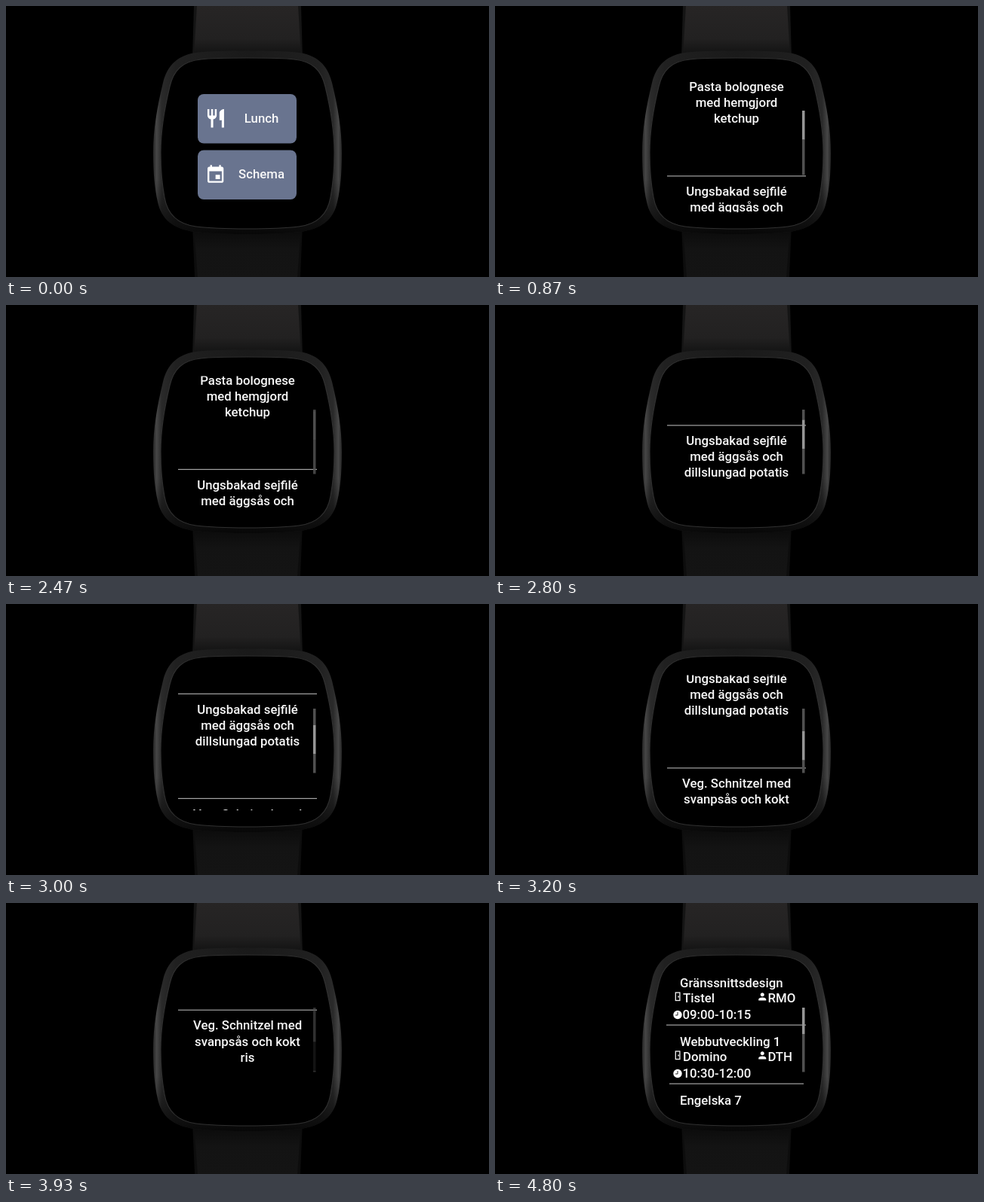
An HTML page with a canvas for the animation above (4990 ms loop, 640 by 360 pixels).

```html
<!DOCTYPE html>
<html lang="sv">
<head>
<meta charset="utf-8">
<title>Watch menu</title>
<style>
html, body { margin: 0; width: 100%; height: 100%; overflow: hidden; background: #000; }
canvas { display: block; width: 640px; height: 360px; }
</style>
</head>
<body>
<canvas id="stage" width="640" height="360"></canvas>
<script>
const ctx = document.getElementById('stage').getContext('2d');
const LOOP = 4990, STEP = 1000 / 15;
const PITCH = 139, LINE = 21.2;

const dishes = [
  ['Pasta bolognese', 'med hemgjord', 'ketchup'],
  ['Ungsbakad sejfilé', 'med äggsås och', 'dillslungad potatis'],
  ['Veg. Schnitzel med', 'svanpsås och kokt', 'ris']
];
const lessons = [
  { title: 'Gränssnittsdesign', room: 'Tistel', who: 'RMO', time: '09:00-10:15' },
  { title: 'Webbutveckling 1', room: 'Domino', who: 'DTH', time: '10:30-12:00' },
  { title: 'Engelska 7' }
];
// [time in ms, scroll offset in px]
const scrollKeys = [[2400, 0], [2467, 7.5], [2800, 66], [3200, 147], [3467, 177], [3733, 222.7]];

const forkKnife = new Path2D('M11 9H9V2H7v7H5V2H3v7c0 2.12 1.66 3.84 3.75 3.97V22h2.5v-9.03C11.34 12.84 13 11.12 13 9V2h-2v7zm5-3v8h2.5v8H21V2c-2.76 0-5 2.24-5 4z');
const calendar = new Path2D('M17 12h-5v5h5v-5zM16 1v2H8V1H6v2H5c-1.1 0-2 .9-2 2v14c0 1.1.9 2 2 2h14c1.1 0 2-.9 2-2V5c0-1.1-.9-2-2-2h-1V1h-2zm3 18H5V8h14v11z');
const person = new Path2D('M12 12c2.2 0 4-1.8 4-4s-1.8-4-4-4-4 1.8-4 4 1.8 4 4 4zm0 2c-2.7 0-8 1.3-8 4v2h16v-2c0-2.7-5.3-4-8-4z');

// Left half of an outline, mirrored around x = 320.
function mirrored(top, curves) {
  const path = new Path2D();
  path.moveTo(320, top);
  for (const c of curves) path.bezierCurveTo(...c);
  const flip = x => 640 - x;
  for (let i = curves.length - 1; i >= 0; i--) {
    const [ax, ay, bx, by] = curves[i];
    const [ex, ey] = i ? curves[i - 1].slice(4) : [320, top];
    path.bezierCurveTo(flip(bx), by, flip(ax), ay, flip(ex), ey);
  }
  path.closePath();
  return path;
}

const shell = mirrored(59.5, [
  [290, 59.5, 270, 60, 255, 61.5], [228, 64.5, 214, 78, 208, 102], [200, 135, 195, 165, 195, 195],
  [195, 222, 197, 243, 201, 260], [206, 284, 222, 296, 250, 300], [270, 302.5, 300, 303, 320, 303]
]);
const glass = mirrored(69, [
  [290, 69, 270, 69.5, 258, 71], [234, 73.5, 222, 85, 217, 107], [209, 140, 205, 165, 205, 195],
  [205, 220, 207, 238, 210, 254], [214, 278, 228, 290, 252, 293], [272, 295.5, 300, 296, 320, 296]
]);

function gradient(x0, y0, x1, y1, stops) {
  const g = ctx.createLinearGradient(x0, y0, x1, y1);
  stops.forEach(([at, color]) => g.addColorStop(at, color));
  return g;
}

function text(str, x, y, align = 'left') {
  ctx.font = '500 16.8px Roboto, sans-serif';
  ctx.textAlign = align;
  ctx.fillStyle = '#f8f8f8';
  ctx.fillText(str, x, y);
}

function icon(path, x, y, scale) {
  ctx.save();
  ctx.translate(x, y);
  ctx.scale(scale, scale);
  ctx.fillStyle = '#fff';
  ctx.fill(path);
  ctx.restore();
}

function rule(x0, x1, y) {
  ctx.fillStyle = '#a4a4a4';
  ctx.fillRect(x0, y, x1 - x0, 1.2);
}

function strap(y0, y1, half0, half1, fill) {
  ctx.beginPath();
  ctx.moveTo(320 - half0, y0);
  ctx.lineTo(320 + half0, y0);
  ctx.lineTo(320 + half1, y1);
  ctx.lineTo(320 - half1, y1);
  ctx.closePath();
  ctx.fillStyle = fill;
  ctx.fill();
}

function watch() {
  ctx.fillStyle = '#000';
  ctx.fillRect(0, 0, 640, 360);
  strap(0, 68, 71, 73, '#151515');
  strap(0, 68, 67, 71, gradient(0, 0, 0, 62, [[0, '#272525'], [0.7, '#222121'], [1, '#141414']]));
  strap(290, 360, 73, 70, '#0d0d0d');
  strap(290, 360, 71, 66, gradient(0, 297, 0, 360, [[0, '#0b0b0b'], [0.4, '#131313'], [1, '#141414']]));

  ctx.fillStyle = gradient(195, 0, 445, 0, [
    [0, '#262626'], [0.018, '#464646'], [0.045, '#2a2a2a'], [0.12, '#202020'], [0.5, '#1a1a1a'],
    [0.88, '#202020'], [0.955, '#2a2a2a'], [0.982, '#464646'], [1, '#262626']
  ]);
  ctx.fill(shell);
  ctx.fillStyle = gradient(0, 230, 0, 303, [[0, '#0000'], [0.9, '#0009'], [1, '#000b']]);
  ctx.fill(shell);
  ctx.fillStyle = '#000';
  ctx.fill(glass);
  ctx.strokeStyle = '#303030';
  ctx.lineWidth = 1.2;
  ctx.stroke(glass);
}

function button(y, label) {
  ctx.fillStyle = '#69748f';
  ctx.beginPath();
  ctx.roundRect(254, y, 131, 65.5, 8);
  ctx.fill();
  text(label, 338.5, y + 37.5, 'center');
}

function menu() {
  button(117, 'Lunch');
  button(191.5, 'Schema');
  icon(forkKnife, 263.3, 134.6, 1.22);
  icon(calendar, 263.5, 210, 1.18);
}

function scrollbar(offset, length, alpha) {
  if (alpha <= 0) return;
  const top = 139 + offset;
  ctx.globalAlpha = alpha;
  ctx.fillStyle = '#505050';
  ctx.fillRect(407, 139, 3.5, offset);
  ctx.fillRect(407, top + length, 3.5, 85.5 - offset - length);
  ctx.globalAlpha = alpha ** 4; // the thumb fades ahead of its track
  ctx.fillStyle = '#969696';
  ctx.fillRect(407, top, 3.5, length);
  ctx.globalAlpha = 1;
}

function scrollAt(t) {
  let [t0, y0] = scrollKeys[0];
  if (t <= t0) return y0;
  for (const [t1, y1] of scrollKeys) {
    if (t <= t1) return y0 + (y1 - y0) * (t - t0) / (t1 - t0);
    [t0, y0] = [t1, y1];
  }
  return y0;
}

function barAlpha(t) {
  if (t < 1330) return Math.min(1, (1330 - t) / 260);
  if (t < 2460 || t > 3990) return 0;
  if (t < 2530) return 0.85;
  return Math.min(1, 1 - (t - 3733) / 500);
}

function lunch(t) {
  const offset = scrollAt(t);
  ctx.save();
  ctx.beginPath();
  ctx.rect(200, 94.5, 240, 179.5);
  ctx.clip();
  dishes.forEach((lines, i) => {
    const y = 113 + i * PITCH - offset;
    lines.forEach((line, j) => text(line, 320, y + j * LINE, 'center'));
    if (i < 2) rule(228, 412, y + 112.3);
  });
  ctx.restore();
  scrollbar(offset * 0.204, 38.5, barAlpha(t));
}

function door(x, y) {
  ctx.strokeStyle = '#f4f4f4';
  ctx.lineWidth = 1.3;
  ctx.strokeRect(x, y, 5.6, 10.5);
  ctx.fillStyle = '#f4f4f4';
  ctx.fillRect(x + 3, y + 4.5, 1.5, 2);
}

function clock(x, y) {
  ctx.fillStyle = '#fff';
  ctx.beginPath();
  ctx.arc(x, y, 5.7, 0, 7);
  ctx.fill();
  ctx.strokeStyle = '#222';
  ctx.lineWidth = 1;
  ctx.beginPath();
  ctx.moveTo(x, y - 3.5);
  ctx.lineTo(x, y + 0.5);
  ctx.lineTo(x - 3, y + 0.5);
  ctx.stroke();
}

function schedule() {
  ctx.save();
  ctx.beginPath();
  ctx.rect(200, 94.5, 240, 177.5);
  ctx.clip();
  lessons.forEach(({ title, room, who, time }, i) => {
    const y = 112 + i * 78;
    text(title, 245, y);
    if (!room) return;
    door(239.3, y + 7);
    text(room, 249, y + 19.7);
    icon(person, 346.7, y + 4.8, 0.63);
    text(who, 361.5, y + 19.7);
    clock(242, y + 36.5);
    text(time, 248.5, y + 42);
    rule(227 + i * 4, 412 - i * 3, y + 49.5);
  });
  ctx.restore();
  scrollbar(0, 35, 1);
}

function draw(now) {
  const t = Math.floor((now % LOOP + 4) / STEP) * STEP;
  watch();
  if (t < 530) menu();
  else if (t >= 860 && t < 4530) lunch(t);
  else if (t >= 4530) schedule();
}

const start = performance.now();
function tick() {
  draw(performance.now() - start);
  requestAnimationFrame(tick);
}
tick();
</script>
</body>
</html>
```
